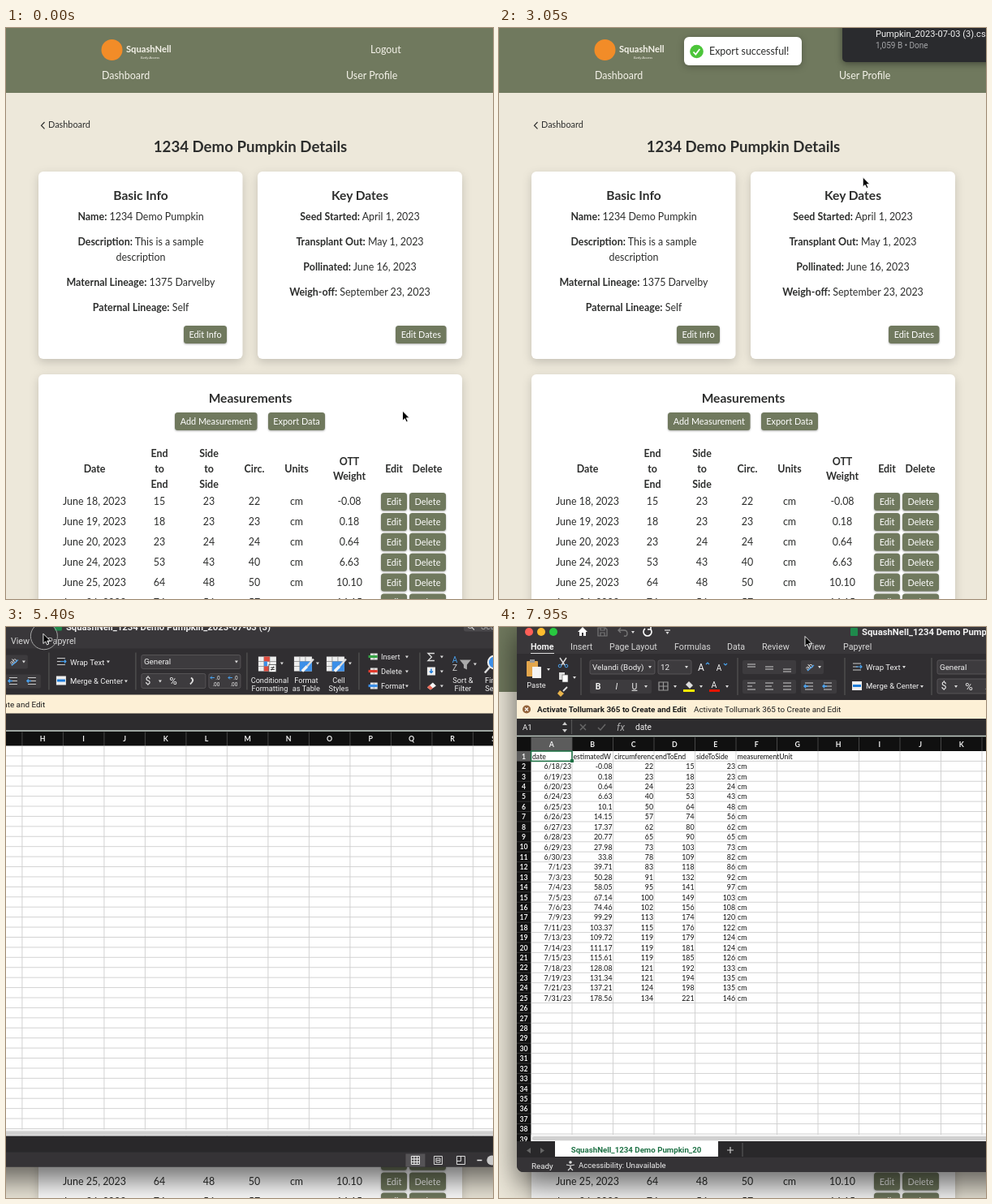
These frames come from a looping animation (600x704 px, 8 s). An HTML page:

```html
<!DOCTYPE html>
<html lang="en">
<head>
<meta charset="utf-8">
<title>Pumpkin data export</title>
<style>
  html, body { margin: 0; width: 100%; height: 100%; overflow: hidden; background: #ede8da; }
  svg { display: block; width: 600px; height: 704px; }
  text { white-space: pre; }
  .page { font-family: Lato, sans-serif; fill: #2d2e2d; }
  .ui { font-family: Roboto, sans-serif; fill: #f1f1f1; }
  .cells { font-family: Lato, sans-serif; fill: #111; }
  .card { filter: drop-shadow(0 4px 6px rgba(0,0,0,.17)); }
  .button { filter: drop-shadow(0 1px 1px rgba(0,0,0,.3)); }
  .frame { filter: drop-shadow(0 16px 18px rgba(0,0,0,.6)); }
</style>
</head>
<body>
<svg id="stage" viewBox="0 0 600 704"></svg>
<script>
const LOOP = 8000;
const OLIVE = '#70795e', OLIVE_DARK = '#555c46';
const MID = 'text-anchor="middle"', END = 'text-anchor="end"', BOLD = 'font-weight="700"';
const APP = 'SquashNell', FILE = 'Pumpkin_2023-07-03 (3)';

// Month/day, estimated weight, circumference, end to end, side to side
const measurements = `6/18 -0.08 22 15 23|6/19 0.18 23 18 23|6/20 0.64 24 23 24|6/24 6.63 40 53 43
6/25 10.1 50 64 48|6/26 14.15 57 74 56|6/27 17.37 62 80 62|6/28 20.77 65 90 65
6/29 27.98 73 103 73|6/30 33.8 78 109 82|7/1 39.71 83 118 86|7/3 50.28 91 132 92
7/4 58.05 95 141 97|7/5 67.14 100 149 103|7/6 74.46 102 156 108|7/9 99.29 113 174 120
7/11 103.37 115 176 122|7/13 109.72 119 179 124|7/14 111.17 119 181 124|7/15 115.61 119 185 126
7/18 128.08 121 192 133|7/19 131.34 121 194 135|7/21 137.21 124 198 135|7/31 178.56 134 221 146`
  .split(/[|\n]/).map(row => row.split(' '));

// Text is placed by the vertical centre of its capitals.
const text = (x, cy, str, size = 12.43, attrs = '') =>
  `<text x="${x}" y="${cy + size * .36}" font-size="${size}" ${attrs}>${str}</text>`;
const rect = (x, y, w, h, fill, attrs = '') =>
  `<rect x="${x}" y="${y}" width="${w}" height="${h}" fill="${fill}" ${attrs}/>`;
const circle = (x, y, r, fill, attrs = '') => `<circle cx="${x}" cy="${y}" r="${r}" fill="${fill}" ${attrs}/>`;
const line = (d, color = '#ddd', width = 1.2, attrs = '') =>
  `<path d="${d}" fill="none" stroke="${color}" stroke-width="${width}" ${attrs}/>`;
const caret = (x, y) => `<path d="M${x - 2} ${y - 1}h4l-2 3z" fill="#ddd"/>`;
const group = (attrs, ...parts) => `<g ${attrs}>${parts.flat(9).join('')}</g>`;
const range = (n, fn) => Array.from({ length: n }, (_, i) => fn(i));

function button(x, y, w, label, id = '') {
  return group('', rect(x, y, w, 22, OLIVE, `rx="3.5" class="button" ${id}`),
    text(x + w / 2, y + 11, label, 10.88, `${MID} fill="#fff"`));
}

const field = (x, y, name, value) =>
  text(x, y, `<tspan ${BOLD}>${name}:</tspan> ${value}`, 12.43, MID);

function pageTable() {
  const heads = [[109, 'Date'], [189, 'End', 'to', 'End'], [250, 'Side', 'to', 'Side'], [306, 'Circ.'],
    [358, 'Units'], [423, 'OTT', 'Weight'], [478, 'Edit'], [519, 'Delete']];
  const headText = heads.map(([x, ...words]) => words.map((word, i) =>
    text(x, 543.5 + (i - (words.length - 1) / 2) * 18.65, word, 12.43, `${MID} ${BOLD}`)));
  const rows = measurements.slice(0, 6).map(([date, weight, circ, length, width], i) => {
    const y = 584 + i * 24.9;
    const cells = [`June ${date.split('/')[1]}, 2023`, length, width, circ, 'cm', (+weight).toFixed(2)];
    return [cells.map((cell, c) => text(heads[c][0], y, cell, 12.43, MID)),
      button(462, y - 11, 32, 'Edit'), button(497, y - 11, 45, 'Delete')];
  });
  return [headText, rows];
}

function page() {
  const card = (x, y, w, h) => rect(x, y, w, h, '#fff', 'rx="6" class="card"');
  const heading = (x, y, str, size = 15.54) => text(x, y, str, size, `${MID} ${BOLD}`);
  return group('class="page"',
    rect(0, 0, 600, 704, '#ede8da'), rect(0, 0, 600, 80, OLIVE),
    circle(130.5, 27, 13, '#f28c28'),
    group('fill="#f5f3ea"',
      text(148, 26, APP, 11.2, BOLD), text(166, 36, 'Early Access', 4.6, 'font-style="italic"'),
      text(118, 59, 'Dashboard'), text(449, 27, 'Logout'), text(419, 59, 'User Profile')),
    line('M47.5 116l-4 4.2 4 4.2', '#2d2e2d'), text(52, 119.5, 'Dashboard', 10.88),
    heading(301, 146, '1234 Demo Pumpkin Details', 18.65),
    card(40, 177, 251.5, 231), card(310, 177, 252, 231), card(40, 427, 522, 320),
    heading(166, 206, 'Basic Info'), heading(436, 206, 'Key Dates'), heading(301, 456, 'Measurements'),
    field(166, 233, 'Name', '1234 Demo Pumpkin'),
    field(166, 264, 'Description', 'This is a sample'), text(166, 282.5, 'description', 12.43, MID),
    field(166, 313.5, 'Maternal Lineage', '1375 Darvelby'),
    field(166, 344.5, 'Paternal Lineage', 'Self'),
    field(436, 233, 'Seed Started', 'April 1, 2023'), field(436, 264, 'Transplant Out', 'May 1, 2023'),
    field(436, 295, 'Pollinated', 'June 16, 2023'), field(436, 326, 'Weigh-off', 'September 23, 2023'),
    button(219, 367, 53, 'Edit Info'), button(480, 367, 62.5, 'Edit Dates'),
    button(208, 474, 101.5, 'Add Measurement'), button(323, 474, 70, 'Export Data', 'id="export"'),
    pageTable());
}

function notices() {
  return [
    group('id="popup" class="ui"',
      rect(423, -20, 200, 62, '#2a2b2e', 'rx="5" style="filter:drop-shadow(0 2px 4px rgba(0,0,0,.4))"'),
      text(464, 7, FILE + '.csv', 11.1), text(464, 21.5, '1,059 B • Done', 10, 'fill="#a5a6a9"')),
    group('id="toast" class="page"',
      rect(228, 11, 145, 35, '#fff', 'rx="6" style="filter:drop-shadow(0 2px 4px rgba(0,0,0,.25))"'),
      group('id="badge"', circle(0, 0, 8.3, '#4cc53a')),
      line('M239.5 29.5l2.8 3 5-6.5', '#fff', 1.8, 'id="check" pathLength="1" stroke-dasharray="1 2"'),
      text(259, 29, 'Export successful!')),
    group('id="dockIcon"', rect(0, 0, 38, 40, '#171717', 'rx="1"'), rect(5, 5, 29, 40, '#eee'),
      rect(12, 2, 14, 6, '#8b8b85', 'rx="2"'), line('M10 13h18M10 17h18M10 21h12', '#aaa', .8)),
  ];
}

// The spreadsheet is drawn where it rests after being dragged.
function ribbon() {
  const label = (x, a, b) => [text(x, 72, a, 9.2, MID), text(x, 82, b, 9.2, MID)];
  const box = (x, y, w, h = 17) => rect(x, y, w, h, '#3d3b3e', 'stroke="#5d5b5e" stroke-width=".8" rx="2"');
  const table = x => [rect(x - 11, 43, 22, 18, '#eee'),
    line(`M${x - 11} 49h22M${x - 11} 55h22M${x - 4} 43v18M${x + 3} 43v18`, '#888', .8), caret(x + 18, 51)];
  const rules = x => [table(x), rect(x - 4, 43, 7, 6, '#dd4b3e'), rect(x - 4, 49, 4, 6, '#3c8fe8'),
    rect(x - 4, 55, 6, 6, '#dd4b3e'), rect(x + 2, 53, 9, 9, '#fff', 'stroke="#444" stroke-width=".8"'),
    line(`M${x + 4} 56.5h5m-5 2.5h5m-1-4l-3 5`, '#222', .9)];
  const styles = x => [table(x), rect(x - 4, 49, 15, 12, '#3c8fe8'),
    line(`M${x + 13} 46l-8 9`, '#ddd', 2.5), line(`M${x + 5} 55l-6 6`, '#f4f4f4', 3.5)];
  const lines = (x, y, short) => line(`M${x - 5} ${y - 4}h10M${x - 5} ${y}h${short}M${x - 5} ${y + 4}h10`, '#ccc', 1.1);
  const indent = (x, y) => [lines(x, y, 10), line(`M${x - 6} ${y}h5m-3-2l-2 2 2 2`, '#4aa3f0', 1.5)];
  const sheetIcon = (x, y, color, s) => [rect(x - 5 * s, y - 5 * s, 11 * s, 10 * s, '#e8e8e8'),
    line(`M${x + .5 * s} ${y - 5 * s}v${10 * s}`, '#888', .7), rect(x - 8 * s, y - 2 * s, 14 * s, 4 * s, color)];
  const decimals = x => [text(x + 2, 69.5, '.0', 6.5, MID), text(x, 77, '.00', 6.5, MID),
    line(`M${x - 7} 69h5m-3-2l-2 2 2 2`, '#4aa3f0', 1)];
  const sum = (x, y) => line(`M${x + 4} ${y - 4}h-8l4.5 4.5-4.5 4.5h8`, '#ddd', 1.3);
  const fillDown = (x, y) => [rect(x - 5, y - 5, 10, 10, '#eee'), line(`M${x} ${y - 3}v5m-2-2l2 2 2-2`, '#1d7bd8', 1.5)];
  const eraser = (x, y) => [`<path d="M${x - 5} ${y + 2}l7-6 4 4-7 5z" fill="#f5f5f5"/>`,
    `<path d="M${x - 5} ${y + 2}l3-3 4 4-3 2z" fill="#ee6c5a"/>`];
  const sortAndFind = x => [
    text(x - 10, 47, 'A', 10, `${MID} fill="#4aa3f0"`), text(x - 10, 57, 'Z', 10, `${MID} fill="#ccc"`),
    `<path d="M${x - 4} 47h14l-5 6v6l-4-2v-4z" fill="#aaa"/>`, caret(x + 15, 52), label(x, 'Sort &amp;', 'Filter'),
    line(`M${x + 33} 56l-6 7`, '#ddd', 2.5), circle(x + 39, 50, 8, '#3c8fe8', 'stroke="#f1f1f1" stroke-width="2"'),
    caret(x + 54, 52), label(x + 40, 'Find &amp;', 'Select')];
  const cellActions = [['Insert', '#36a546'], ['Delete', '#e23b2e'], ['Format', '#3c8fe8']];

  const wide = group('id="wideRibbon"',
    cellActions.map(([name, color], i) => {
      const x = 833 + i * 40;
      return [sheetIcon(x - 2, 51, color, 1.6), caret(x + 15, 52), text(x, 72, name, 9.2, MID)];
    }),
    sum(956, 43), fillDown(956, 61), eraser(956, 79),
    text(966, 43, 'AutoSum', 9.2), text(966, 61, 'Fill', 9.2), text(966, 79, 'Clear', 9.2),
    caret(1008, 43), caret(982, 61), caret(991, 79), line('M948 38v46', '#555'), sortAndFind(1034));
  const compact = group('id="compactRibbon"',
    cellActions.map(([name, color], i) => {
      const y = 43 + i * 18;
      return [sheetIcon(826, y, color, .8), text(835, y, name, 9.2), caret(867, y)];
    }),
    line('M883 38v46', '#555'), sum(897, 43), fillDown(897, 61), eraser(897, 79),
    [43, 61, 79].map(y => caret(910, y)), sortAndFind(936));

  const tabs = [[39, 'Home'], [88, 'Insert'], [136, 'Page Layout'], [216, 'Formulas'], [281, 'Data'],
    [324, 'Review'], [379, 'View'], [424, 'Papyrel']];
  return [
    rect(22, -10, 1090, 44, '#39373a'), rect(22, 33, 1090, 57, '#302e31'),
    circle(37, 6, 5, '#ff5f57'), circle(52, 6, 5, '#febc2e'), circle(67, 6, 5, '#28c840'),
    '<path d="M97 6l6-6 6 6h-2v5h-3V7h-2v4h-3V6z" fill="#fff"/>',
    line('M122 1h9l2 2v8h-11zM125 1v3h5v-3M125 11v-4h5v4', '#777'),
    line('M150 1l-3 3 3 3M147 4h7q4 0 4 4t-4 3', '#777', 1.4), caret(165, 6),
    line('M180 2a5 5 0 1 0 6 0M187 -1v4h-4', '#fff', 1.6), line('M204 4h7', '#ddd'), caret(207.5, 7),
    rect(433, 1, 9, 10, '#1f8a4c', 'rx="1"'),
    text(447, 6, `${APP}_1234 Demo ${FILE}`, 11.3, BOLD),
    rect(937, -4, 139, 16, '#4b494c', 'rx="3"'), circle(945, 5, 3, 'none', 'stroke="#ccc"'),
    line('M947 7l3 3', '#ccc'), text(958, 6, 'Search Sheet', 10.5, 'fill="#aaa"'),
    circle(1093, 5, 3, '#eee'), rect(1088, 9, 10, 4, '#eee', 'rx="2"'),
    tabs.map(([x, name], i) => text(x, 24, name, 10.7, i ? 'fill="#d8d8d8"' : BOLD)), line('M39 32.5h29', '#ddd', 1),
    line('M1041 22h-2v7h8v-3M1042 26q0-5 6-5m-2-3l3 3-3 3', '#ddd'), text(1054, 23, 'Share', 10.7),
    line('M1091 26l4-4 4 4', '#ddd', 1.5),
    rect(34, 42, 14, 19, '#e3a64c', 'rx="1"'), rect(38, 40, 6, 4, '#999'), rect(41, 49, 11, 14, '#f4f4f4'),
    caret(61, 52), text(46, 72, 'Paste', 9.2, MID),
    line('M75 38l6 9M83 38l-6 9', '#ddd', 1.4), circle(75, 48, 1.8, 'none', 'stroke="#4aa3f0"'),
    circle(83, 48, 1.8, 'none', 'stroke="#4aa3f0"'),
    rect(74, 56, 7, 9, '#ddd'), rect(78, 59, 7, 9, '#fff', 'stroke="#555" stroke-width=".6"'), caret(93, 62),
    line('M84 74l-5 5', '#ddd', 2), '<path d="M75 78l5 4-4 4-4-4z" fill="#e9b44c"/>',
    [101, 294, 426, 533, 670, 808].map(x => line(`M${x} 38v46`, '#555')),
    box(112, 41, 80), text(115, 49, 'Velandi (Body)', 9.8), caret(186, 49),
    box(196, 41, 41), text(199, 49, '12', 9.8), caret(231, 49),
    text(249, 50, 'A', 12, MID), line('M255 46l2-2 2 2', '#4aa3f0'),
    text(271, 50, 'A', 10, MID), line('M277 45l2 2 2-2', '#4aa3f0'),
    rect(112, 65, 76, 17, '#3d3b3e', 'rx="2"'),
    text(122, 73, 'B', 10.5, `${MID} ${BOLD}`), text(145, 73, 'I', 10.5, `${MID} font-style="italic"`),
    text(167, 73, 'U', 10.5, `${MID} text-decoration="underline"`), caret(181, 73),
    line('M197 68h11v10h-11zM202.5 68v10M197 73h11', '#999'), caret(217, 73),
    '<path d="M230 71l4-4 5 5-4 4z" fill="#ddd"/>', rect(227, 77, 14, 3, '#ffee00'), caret(249, 73),
    text(265, 71, 'A', 10.5, MID), rect(259, 77, 13, 3, '#e51400'), caret(281, 73),
    rect(300, 41, 66, 17, '#3d3b3e', 'rx="2"'), rect(300, 65, 66, 17, '#3d3b3e', 'rx="2"'),
    [311, 333, 355].map((x, i) => [line(`M${x - 5} ${46 + i * 3}h10m-10 3h10`, '#ccc', 1), lines(x, 73, 6 + i * 2)]),
    rect(372, 41, 28, 17, '#3d3b3e', 'rx="2"'), rect(372, 65, 44, 17, '#3d3b3e', 'rx="2"'),
    text(382, 49, 'ab', 8.5, `${MID} transform="rotate(-40 382 49)"`), line('M380 54l8-7', '#4aa3f0'), caret(395, 49),
    indent(382, 73), indent(405, 73),
    lines(441, 49, 6), line('M440 49h7m-2-2l2 2-2 2', '#4aa3f0'), text(452, 50, 'Wrap Text', 9.6), caret(499, 49),
    rect(435, 67, 12, 11, '#eee'), line('M436 72.5h10', '#1d7bd8', 3),
    text(452, 73, 'Merge &amp; Center', 9.5), caret(521, 73),
    box(540, 41, 122), text(543, 49, 'General', 9.8), caret(657, 49),
    box(540, 64, 79, 18), text(548, 73, '$', 12, MID), caret(563, 73), text(579, 73, '%', 13, MID),
    line('M601 69q5 3-1 8', '#ddd', 2), box(623, 64, 39, 18), decimals(632), decimals(654),
    rules(695), styles(739), styles(779),
    label(698, 'Conditional', 'Formatting'), label(743, 'Format', 'as Table'), label(783, 'Cell', 'Styles'),
    wide, compact,
    rect(22, 90, 1090, 24, '#fdf0d6'), circle(34, 101.5, 5, '#93633a'), line('M32 99.5l4 4m0-4l-4 4', '#fff'),
    group('fill="#1c1c1c"', text(47, 101.5, 'Activate Tollumark 365 to Create and Edit', 9.9, BOLD),
      text(240, 101.5, 'Activate Tollumark 365 to Create and Edit', 9.9),
      rect(1056, 94, 50, 14, '#fff7e6', 'rx="3" stroke="#555" stroke-width=".8"'), text(1081, 101.5, 'Activate', 9.6, MID)),
  ];
}

function sheet() {
  const left = 39.5, top = 153, colW = 50.5, rowH = 12.42;
  const headFont = `${MID} ${BOLD} font-family="Lato, sans-serif"`;
  const rowY = i => top + rowH * (i + .53);
  const cell = (col, row, str) => text(left + colW * (col + 1) - 1, rowY(row), str, 8.8, END);
  const heads = ['date', 'estimatedW', 'circumferenc', 'endToEnd', 'sideToSide', 'measurementUnit'];
  return group('id="sheet"',
    rect(22, 113, 1090, 22, '#2d2c2e'), line('M89.5 114v18', '#555'), text(29, 123.5, 'A1', 9.6),
    '<path d="M78 121l3-4 3 4zM78 126l3 4 3-4z" fill="#ccc"/>',
    line('M100 120l7 7m0-7l-7 7M122 124l3 3 6-7', '#666', 1.5),
    text(150, 123.5, 'fx', 12, `${MID} font-style="italic" fill="#aaa"`), text(168, 123.5, 'date', 10.2), caret(1106, 123),
    rect(22, 135, 1090, 18, '#101010'), line('M22 134.5h1090', '#c4cfc8', 1.5),
    rect(22, top, 1090, 500, '#fff'), rect(22, top, 17.5, 500, '#101010'),
    rect(left, 136, colW, 17, '#5c5c5c'), rect(22, top, 17.5, rowH, '#5c5c5c'),
    range(21, i => {
      const x = left + colW * (i + 1);
      return [line(`M${x} 136v17`, '#555', .8), line(`M${x} ${top}v500`, '#cfcfcf', .9),
        text(x - colW / 2, 144.5, String.fromCharCode(65 + i), 8.8, headFont)];
    }),
    range(40, i => {
      const y = top + rowH * (i + 1);
      return [line(`M${left} ${y}H1110`, '#cfcfcf', .9), line(`M22 ${y}h17`, '#444', .7),
        text(30.5, rowY(i), i + 1, 8.6, headFont)];
    }),
    group('class="cells"',
      heads.map((name, col) => text(left + colW * col + 1.5, rowY(0), name, 8.7)),
      measurements.map(([date, ...values], i) => [cell(0, i + 1, date + '/23'),
        values.map((value, c) => cell(c + 1, i + 1, value)), text(294, rowY(i + 1), 'cm', 8.8)])),
    rect(left, top, colW, rowH, 'none', 'stroke="#1e7145" stroke-width="1.6"'), rect(88, 163, 4, 4, '#1e7145'));
}

function spreadsheet() {
  return group('id="window" class="ui"',
    rect(22, -10, 1090, 682, '#2d2c2e', 'rx="8" class="frame"'), ribbon(), sheet(),
    rect(1104, 141, 6, 480, '#ececec', 'rx="3"'),
    rect(39.5, 626, 1072, 8, '#f4f4f4'), rect(41, 628, 1006, 5, '#d0d0d0', 'rx="2.5"'),
    rect(22, 634, 1090, 21, '#29282a'),
    '<path d="M22 654h1090v10a8 8 0 0 1-8 8H30a8 8 0 0 1-8-8z" fill="#353336"/>',
    '<path d="M39 642v7l-5-3.5zM51 642v7l5-3.5z" fill="#666"/>',
    rect(69, 634, 201, 19, '#fff'), text(169, 645, `${APP}_1234 Demo Pumpkin_20`, 9.7, `${MID} ${BOLD} fill="#1e7145"`),
    group('id="addSheet"', line('M281 645h8m-4-4v8', '#ccc')), line('M300 636v17', '#555'),
    text(40, 664, 'Ready', 9.8), circle(88, 660, 1.8, '#ddd'), line('M83 663l5 1 5-1M88 664v3l-3 3m3-3l3 3', '#ddd'),
    text(98, 664, 'Accessibility: Unavailable', 9.6),
    group('id="zoomBar"',
      rect(871, 656, 24, 16, '#555356', 'id="gridView"'),
      line('M878 659h10v10h-10zM881.5 659v10M885 659v10M878 662.5h10M878 666h10', '#eee', 1),
      line('M906 659h10v10h-10zM908.5 661.5h5v5h-5zM909 664h4', '#ddd', 1),
      line('M934 659h10v10h-10zM939 659v6h-5', '#ddd', 1),
      line('M959 664h6M1054 664h6m-3-3v6', '#eee', 1.5), line('M972 664h77M1010 661v6', '#888', 1.5),
      circle(977, 664, 6, '#c9c9c9'), text(1073, 664, '10%', 9.6, 'id="zoom"')));
}

const pointer = group('id="cursor"',
  circle(1, 3, 16.5, 'rgba(0,0,0,.12)', 'id="press" stroke="#a5a5a5" stroke-width="1"'),
  '<path d="M0 0v12.2l2.8-2.6 1.9 4.1 2-.9-1.9-4h3.9z" fill="#000" stroke="#fff" stroke-width=".9"/>');

const stage = document.getElementById('stage');
stage.innerHTML = [page(), notices(), spreadsheet(), pointer].flat(9).join('');

const el = id => document.getElementById(id);
const show = (id, visible) => el(id).setAttribute('display', visible ? 'inline' : 'none');
const move = (id, transform) => el(id).setAttribute('transform', transform);
const progress = (t, from, to) => Math.min(1, Math.max(0, (t - from) / (to - from)));
const smooth = p => p * p * (3 - 2 * p);
const easeOut = p => 1 - (1 - p) ** 3;

// time, x, y
const cursorPath = [[50, 488.5, 472], [850, 367, 488], [2600, 367, 488], [3350, 492, 20],
  [3650, 492, 20], [4050, 496, 54.5], [4350, 496, 54.5], [4700, -185, 9]];

const windowX = t => -563 * (1 - smooth(progress(t, 5150, 5794)));
const windowY = t => -6.5 * (1 - smooth(progress(t, 5400, 5794)));

function cursorAt(t) {
  if (t > 5100) return [377 + windowX(t + 33), 11.5 + windowY(t) / 2];
  const next = cursorPath.findIndex(([time]) => time > t);
  if (next === 0) return cursorPath[0].slice(1);
  if (next < 0) return cursorPath.at(-1).slice(1);
  const [t0, x0, y0] = cursorPath[next - 1], [t1, x1, y1] = cursorPath[next];
  const p = smooth(progress(t, t0, t1));
  return [x0 + (x1 - x0) * p, y0 + (y1 - y0) * p];
}

function drawToast(t) {
  const enter = easeOut(progress(t, 1400, 1750)), leave = easeOut(progress(t, 3400, 3800));
  const scale = .6 + .4 * enter - .4 * leave;
  const dy = -70 * (1 - enter) - 52 * leave;
  show('toast', t >= 1400 && t < 3800);
  el('toast').setAttribute('opacity', .5 + .5 * enter - leave);
  move('toast', `translate(300.5 ${28.5 + dy}) scale(${scale}) translate(-300.5 -28.5)`);
  move('badge', `translate(243.5 29) scale(${easeOut(progress(t, 1500, 1750))})`);
  const drawn = progress(t, 1690, 1890);
  el('check').setAttribute('stroke-dashoffset', 1 - drawn);
  show('check', drawn > 0);
}

function drawWindow(t) {
  const loaded = t >= 5000;
  show('window', t >= 4450);
  el('window').setAttribute('opacity', progress(t, 4420, 4600));
  move('window', `translate(${windowX(t)} ${windowY(t)})`);
  move('sheet', `translate(0 ${-23 * (1 - progress(t, 4700, 4828))})`);
  show('wideRibbon', !loaded);
  show('compactRibbon', loaded);
  show('gridView', loaded);
  move('zoomBar', `translate(${loaded ? -5.5 : 0} 0)`);
  el('zoom').textContent = loaded ? '100%' : '10%';
  show('addSheet', t >= 6000);
}

function draw(t) {
  const [x, y] = cursorAt(t);
  move('cursor', `translate(${x} ${y})`);
  show('press', t >= 5150 && t < 6100);
  const hover = x > 323 && x < 393 && y > 474 && y < 496;
  el('export').setAttribute('fill', hover ? OLIVE_DARK : OLIVE);

  drawToast(t);
  show('popup', t >= 1500 && t < 3650);
  const bounce = progress(t, 1600, 2100);
  show('dockIcon', bounce > 0 && bounce < 1);
  move('dockIcon', `translate(372 ${704 - 27 * Math.sin(Math.PI * bounce)})`);
  drawWindow(t);
}

const start = performance.now();
function tick() {
  draw((performance.now() - start) % LOOP);
  requestAnimationFrame(tick);
}
tick();
</script>
</body>
</html>
```
